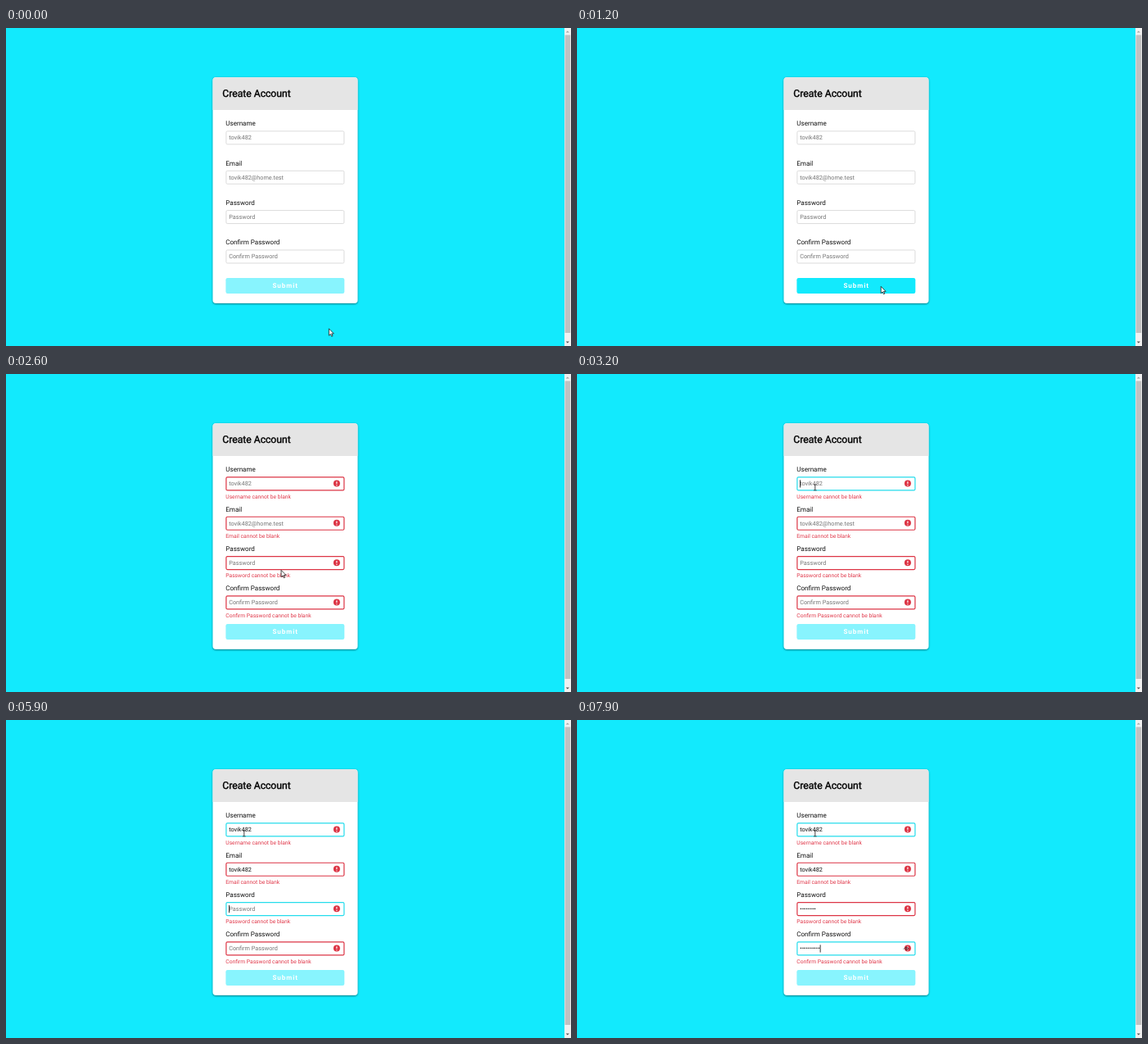
An HTML page for the animation above (8 s loop, 690x388 px).

```html
<!DOCTYPE html>
<html lang="en">
<head>
<meta charset="utf-8">
<title>Create Account form</title>
<style>
  html, body { margin: 0; width: 100%; height: 100%; overflow: hidden; background: #12eafd; }
  svg { display: block; width: 100%; height: 100%; }
  text { font-family: Roboto, Arial, sans-serif; text-rendering: geometricPrecision; white-space: pre; }
  .title { font-size: 12.16px; stroke: #000; stroke-width: .38px; }
  .label { font-size: 8.06px; fill: #111; }
  .value { font-size: 7.27px; }
  .error { font-size: 6.72px; fill: #e0384a; }
  .submit { font-size: 8.06px; font-weight: 700; letter-spacing: .92px; fill: #fff; }
</style>
</head>
<body>
<svg id="stage" viewBox="0 0 690 388">
  <defs>
    <filter id="shadow" x="-10%" y="-10%" width="120%" height="120%">
      <feDropShadow dx="0" dy=".8" stdDeviation="1.1" flood-color="#000" flood-opacity=".6"/>
    </filter>
  </defs>
  <rect width="690" height="388" fill="#12eafd"/>

  <rect x="682" width="8" height="388" fill="#f1f1f1"/>
  <rect x="682.6" y="8.5" width="6.6" height="363.5" fill="#c1c1c1"/>
  <path d="M683.7 5.6L685.8 3.4L687.9 5.6Z" fill="#a3a3a3"/>
  <path d="M683.7 382.4L685.8 384.6L687.9 382.4Z" fill="#505050"/>

  <rect x="252.6" y="60.3" width="176.8" height="275.4" rx="3.6" fill="#fff" filter="url(#shadow)"/>
  <path d="M252.6 100V63.9a3.6 3.6 0 0 1 3.6-3.6H425.8a3.6 3.6 0 0 1 3.6 3.6V100Z" fill="#e5e5e5"/>
  <text class="title" x="264.3" y="84.2">Create Account</text>

  <g id="fields"></g>

  <rect id="button" x="268.4" y="305" width="144.9" height="18.9" rx="2.2" fill="#12eafd"/>
  <text class="submit" x="325.5" y="316.9">Submit</text>

  <path id="arrow" d="M0 0V8.4L2 6.6L3.3 9.5L4.6 8.9L3.3 6.1H5.9Z" fill="#fff" stroke="#111" stroke-width=".75" stroke-linejoin="round"/>
  <path id="beam" d="M-1.7 -3.4H-.5L0 -3L.5 -3.4H1.7M0 -3V3M-1.7 3.4H-.5L0 3L.5 3.4H1.7" fill="none" stroke="#222" stroke-width=".85"/>
</svg>
<script>
const LOOP = 8000;
const TEXT_X = 272.2;
const RED = '#dc3545', CYAN = '#25dcec', GREY = '#d7d7d7';
const USER = 'tovik482';
const $ = id => document.getElementById(id);

function add(parent, tag, attrs, text = '') {
  const el = document.createElementNS('http://www.w3.org/2000/svg', tag);
  set(el, attrs);
  el.textContent = text;
  parent.appendChild(el);
  return el;
}

function set(el, attrs) {
  for (const key in attrs) el.setAttribute(key, attrs[key]);
}

const show = (el, on) => el.setAttribute('visibility', on ? 'visible' : 'hidden');
const ramp = (t, from, to) => Math.min(1, Math.max(0, (t - from) / (to - from)));
const ease = p => p * p * (3 - 2 * p);
const mix = (a, b, p) => a + (b - a) * p;
const dots = n => '•'.repeat(n);

function makeField([name, hint], i) {
  const g = add($('fields'), 'g', { transform: `translate(0 ${i * 48.35})` });
  add(g, 'text', { class: 'label', x: 268.3, y: 119.4 }, name);
  const box = add(g, 'rect', { x: 268.9, y: 125.9, width: 144, height: 16, rx: 1.5, fill: '#fff' });
  const value = add(g, 'text', { class: 'value', x: TEXT_X, y: 136.4 });
  const caret = add(g, 'rect', { y: 129.3, width: .8, height: 9.2, fill: '#000' });

  const alert = add(g, 'g', {});
  add(alert, 'circle', { cx: 403.9, cy: 133.5, r: 4, fill: RED });
  add(alert, 'path', { d: 'M403.9 131.2V133.9M403.9 135.1V136.2', stroke: '#fff', 'stroke-width': 1.15 });
  add(alert, 'text', { class: 'error', x: 268.3, y: 151.6 }, name + ' cannot be blank');

  // password reveal eye, partly hidden by the alert icon
  const eye = add(g, 'g', { fill: 'none', stroke: '#333', 'stroke-width': .8 });
  add(eye, 'path', { d: 'M398.8 134.6Q402.3 129.8 405.8 134.6' });
  add(eye, 'circle', { cx: 402.4, cy: 134.6, r: 1 });
  return { hint, box, value, caret, alert, eye };
}

const fields = [
  ['Username', USER],
  ['Email', USER + '@home.test'],
  ['Password', 'Password'],
  ['Confirm Password', 'Confirm Password']
].map(makeField);

// Each field: what is typed, when it has focus, when its caret and eye show
function fieldState(t) {
  const within = (a, b) => t >= a && t < b;
  const confirmed = t < 7400 ? 0 : t < 7900 ? Math.min(8, 2 * Math.floor((t - 7200) / 100) - 2) : 10;
  return [
    { text: t < 4200 ? '' : t < 4300 ? USER.slice(0, 4) : USER,
      focus: t >= 3100, caret: within(3200, 3700) || within(4200, 4500) },
    { text: t < 5500 ? '' : USER,
      focus: within(4500, 5800), caret: within(4500, 5000) || within(5500, 5800) },
    { text: t < 6600 ? '' : dots(8),
      focus: within(5800, 6900), caret: within(5800, 6300) || within(6600, 6900), eye: within(6600, 6900) },
    { text: dots(confirmed),
      focus: t >= 6900, caret: within(6900, LOOP), eye: t >= 7400 }
  ];
}

function drawField(f, s, t) {
  const invalid = t >= 2300;
  const colour = s.focus ? CYAN : invalid ? RED : GREY;
  set(f.box, {
    stroke: colour,
    'stroke-width': invalid ? 1.2 : .9,
    'stroke-opacity': invalid && t < 2400 ? .8 : 1
  });
  f.value.textContent = s.text || f.hint;
  f.value.setAttribute('fill', s.text ? '#111' : '#757575');
  const end = s.text ? f.value.getComputedTextLength() : 0;
  f.caret.setAttribute('x', TEXT_X + end);
  show(f.caret, s.caret);
  show(f.alert, invalid);
  show(f.eye, s.eye);
}

function pointer(t) {
  if (t < 1800) {
    const p = ease(ramp(t, 100, 1100));
    return [mix(394.4, 371.2, p), mix(366.8, 315.3, p)];
  }
  if (t < 2300) return [369.5, 315.3];
  const p = ease(ramp(t, 2300, 3100));
  return [mix(357, 290.8, p), mix(286, 138.5, p)];
}

function drawPointer(t) {
  const [x, y] = pointer(t);
  const row = (y - 125.5) % 48.35;
  const typing = t > 2300 && y < 288 && row >= 0 && row < 16.5;
  for (const id of ['arrow', 'beam']) set($(id), { transform: `translate(${x} ${y})` });
  show($('arrow'), !typing);
  show($('beam'), typing);
}

function draw(time) {
  const t = Math.floor(time % LOOP / 100) * 100;
  const states = fieldState(t);
  fields.forEach((f, i) => drawField(f, states[i], t));
  const hover = ramp(t, 900, 1200) - ramp(t, 2300, 2600);
  $('button').setAttribute('fill-opacity', .5 + .5 * hover);
  drawPointer(t);
}

const start = performance.now();
function tick() {
  draw(performance.now() - start);
  requestAnimationFrame(tick);
}
tick();
</script>
</body>
</html>
```
